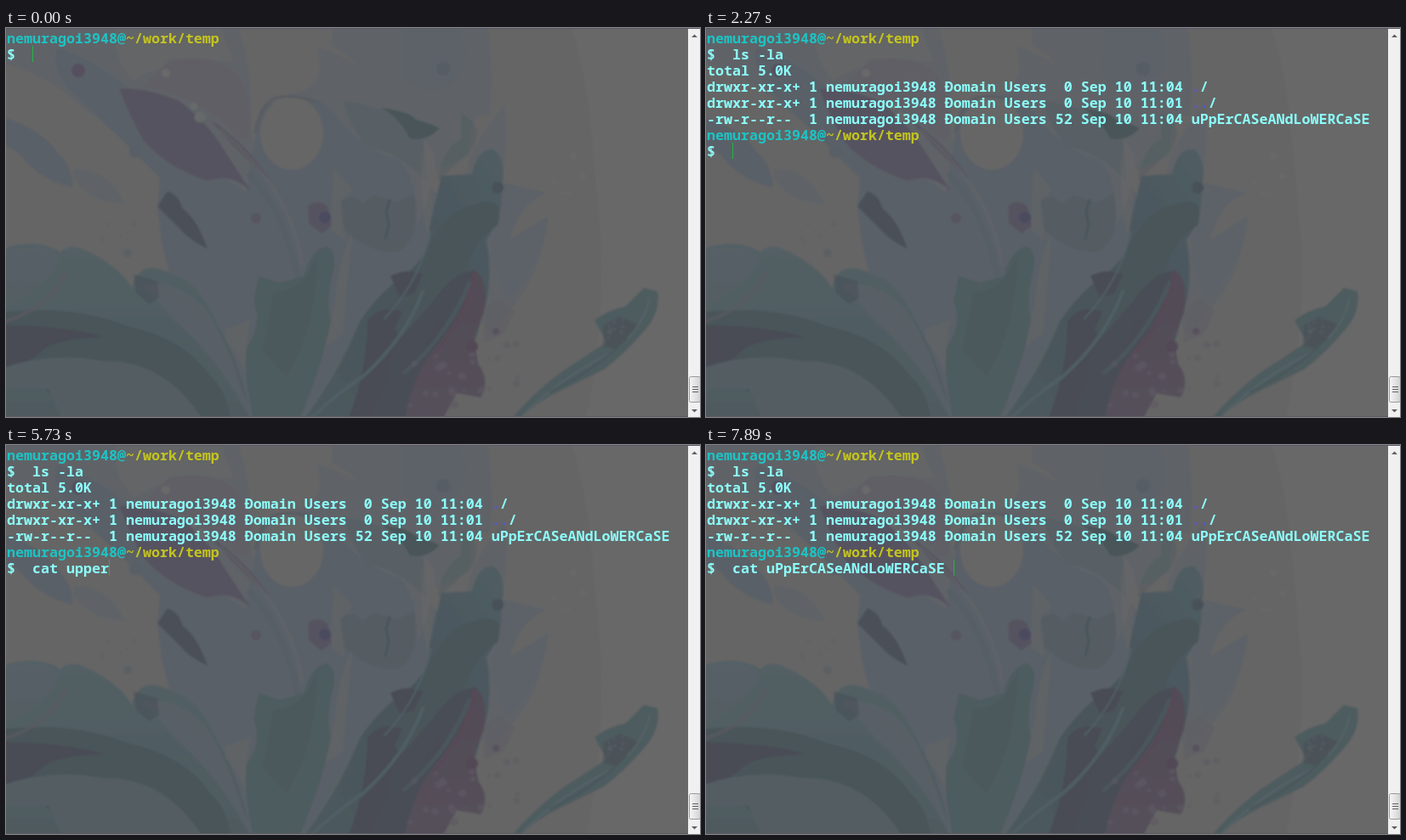
Write an HTML page that moves like this. It is 816x458 px and loops after 8000 ms.

```html
<!DOCTYPE html>
<html lang="en">
<head>
<meta charset="utf-8">
<title>Terminal session</title>
<style>
  html, body { margin: 0; width: 100%; height: 100%; overflow: hidden; background: #656565; }
  svg { display: block; width: 816px; height: 458px; }
  text { font: 600 16.667px "Noto Sans Mono", "DejaVu Sans Mono", monospace; white-space: pre; fill: #8cfffc; }
  .user { fill: #1ec3c4; }
  .path { fill: #c4c41f; }
  .dir { fill: #5858d8; }
  .slate { fill: #5a6167; }
  .mist { fill: #5f6468; }
  .teal { fill: #4e5b5f; }
  .deep { fill: #495559; }
  .ink { fill: #484c55; }
  .plum { fill: #575260; }
  .haze { fill: #605e66; }
  .pale { fill: #666; }
  .vein { fill: none; stroke-linecap: round; }
</style>
</head>
<body>
<svg viewBox="0 0 816 458">
  <defs>
    <linearGradient id="thumb"><stop stop-color="#f6f6f6"/><stop offset="1" stop-color="#d2d2d4"/></linearGradient>
    <linearGradient id="leaf" x2="0" y2="1"><stop stop-color="#526065"/><stop offset="1" stop-color="#4f5a5f"/></linearGradient>
    <linearGradient id="plume" x1="1" x2="0" y2="1"><stop stop-color="#505d63"/><stop offset=".5" stop-color="#48545a"/><stop offset="1" stop-color="#4d5a5e"/></linearGradient>
    <linearGradient id="bloom" x2="0" y2="1"><stop stop-color="#524b56"/><stop offset="1" stop-color="#55505b"/></linearGradient>
    <filter id="soft" x="0" y="0" width="1" height="1"><feGaussianBlur stdDeviation="1.1"/></filter>
  </defs>

  <rect width="816" height="458" fill="#656565"/>
  <g id="painting" filter="url(#soft)">
    <rect x="-9" y="-9" width="834" height="476" fill="#656565"/>
    <path fill="#686868" d="M618 -9H825V467H680Q712 330 692 170Q685 60 665 0Z"/>

    <!-- upper washes -->
    <path class="mist" d="M-9 -9H270Q292 50 287 110L300 190L185 178Q130 120 88 92Q45 52 -9 40Z"/>
    <path class="slate" d="M60 22Q110 40 145 72L150 112L182 150V178Q120 115 80 78Q50 50 60 22Z"/>
    <path class="pale" opacity=".6" d="M130 -9H250L268 40Q200 32 150 62Q120 30 130 -9Z"/>
    <path class="mist" d="M365 22Q410 35 428 60L442 95Q470 98 496 118L500 185L410 200L372 150Q370 90 330 78Q380 74 365 22Z"/>
    <path class="mist" d="M383 -9H566Q575 60 568 105Q545 92 545 150L500 170Q505 130 470 95L440 93Q428 45 383 20Z"/>
    <path class="slate" opacity=".5" d="M470 -9H525Q560 40 515 73Q470 78 466 45Z"/>
    <path class="slate" d="M0 106Q42 120 60 146Q80 165 78 188Q38 178 18 150L0 138Z"/>
    <path class="mist" d="M80 166Q118 164 140 207Q98 206 80 176Z"/>

    <!-- central wash -->
    <path class="slate" d="M184 140Q235 165 282 192Q292 130 300 95Q360 60 390 106Q425 150 480 160L510 200Q515 255 480 285L440 330L400 400L340 467H280L195 300L183 252L178 212Z"/>
    <path class="mist" d="M390 85Q455 80 500 115L498 150Q505 200 480 235Q490 160 440 142Q410 135 390 85Z"/>
    <path class="teal" opacity=".4" d="M396 85Q455 92 490 130L494 180Q460 145 425 140Q405 120 396 85Z"/>
    <path class="deep" d="M440 94Q475 98 482 108Q498 112 510 118Q495 134 475 130Q460 102 440 94Z"/>
    <ellipse class="pale" cx="336" cy="124" rx="37" ry="43"/>
    <path class="vein" stroke="#595c62" stroke-width="3" d="M293 122Q300 88 318 82Q340 77 365 88"/>
    <path class="pale" opacity=".65" d="M385 165L407 190L392 205L398 250L383 238Z"/>
    <path class="pale" opacity=".55" d="M492 130L504 148L506 172L496 245Q482 190 492 130Z"/>

    <!-- purple petals -->
    <path class="haze" d="M192 38Q250 30 272 55Q293 88 285 130L272 130Q236 82 160 70Z"/>
    <path class="plum" d="M133 72Q160 68 204 86Q238 112 256 143L288 192Q265 170 237 180Q190 165 162 133Q146 105 133 72Z"/>
    <path class="plum" d="M240 108Q280 133 310 178Q275 150 240 108Z"/>
    <path class="vein" stroke="#626468" stroke-width="4" opacity=".6" d="M252 120Q335 190 348 278"/>
    <path class="vein" stroke="#565f65" stroke-width="7" d="M287 173Q335 225 350 330"/>
    <path class="ink" opacity=".8" d="M178 210L190 192Q204 197 207 212Q225 225 237 260Q216 250 206 238Q190 222 178 210Z"/>
    <path class="plum" d="M355 210Q365 200 378 210L383 233L371 242L356 230Z"/>
    <circle cx="375" cy="223" r="7" fill="#4c4b60"/>
    <path class="teal" opacity=".5" d="M394 203L409 198L420 207L432 197L460 205L480 195Q490 245 462 263Q430 268 398 238Z"/>
    <path class="vein" stroke="#4a555b" stroke-width="3" d="M451 203L447 216L450 232L446 248"/>
    <path class="slate" d="M392 262Q430 260 440 268L470 280L460 310L430 320Q392 315 392 262Z"/>

    <!-- lower left leaves -->
    <path fill="url(#leaf)" d="M-9 262Q35 245 64 264Q75 252 94 262Q133 280 148 306Q156 270 196 290Q225 295 250 350Q278 400 290 467H-9Z"/>
    <path class="slate" opacity=".5" d="M0 262Q40 252 62 268Q56 300 0 328Z"/>
    <path class="slate" opacity=".8" d="M160 300Q220 300 246 350Q274 400 286 458Q250 390 200 345Z"/>
    <path class="deep" d="M-9 335Q80 325 140 350Q210 365 240 410Q262 430 265 467H80Q60 420 -9 400Z"/>
    <path class="ink" d="M-9 350Q70 350 115 364Q55 365 40 382Q20 400 -9 402Z"/>
    <path fill="#525d62" d="M-9 402Q50 380 115 392Q190 390 235 467H70L50 425L-9 425Z"/>
    <path class="vein" stroke="#585a61" stroke-width="5" opacity=".8" d="M0 345Q50 330 70 288"/>
    <path class="vein" stroke="#566166" stroke-width="5" d="M162 305Q240 345 288 456"/>
    <path class="ink" opacity=".5" d="M150 290L178 298L180 318L168 325L153 312Z"/>
    <path class="pale" opacity=".6" d="M258 355L288 344Q277 375 293 410L286 420Q276 385 258 368Z"/>

    <!-- middle leaves -->
    <path class="teal" d="M297 292L322 300L350 292Q358 262 376 257Q389 260 385 285Q376 320 382 345Q372 400 342 467H292Q278 405 283 375Q302 350 291 322Z"/>
    <path class="deep" opacity=".45" d="M315 312Q350 310 365 270Q365 350 330 410L302 380Z"/>
    <path class="pale" opacity=".5" d="M407 240Q388 285 388 320L375 375L396 360Q400 310 407 240Z"/>
    <path class="vein" stroke="#586266" stroke-width="5" d="M410 345Q395 395 350 456"/>

    <!-- main plume -->
    <path class="mist" d="M545 155Q560 120 586 90Q592 140 582 182L635 194Q603 206 592 250L637 222Q630 290 595 328L570 360L520 300Z"/>
    <path class="slate" opacity=".7" d="M582 182L635 194Q603 206 592 250L637 222Q630 280 590 320L570 270Z"/>
    <path class="teal" opacity=".45" d="M535 100Q565 115 546 145L508 180Q510 145 535 130Z"/>
    <path fill="url(#plume)" d="M345 467Q390 410 416 345Q440 310 472 288Q500 265 498 235L512 174L548 172Q555 140 574 143Q590 156 582 190Q586 220 565 250Q575 300 558 346Q545 400 500 467Z"/>
    <path class="deep" d="M495 265Q515 215 550 208Q588 195 578 232Q544 255 535 300Q505 340 480 400L440 420Q460 330 495 265Z"/>
    <path class="ink" d="M452 292Q470 282 490 290L480 312L464 318ZM425 345Q440 325 466 334L456 355L466 365Q445 390 450 408L426 467H400Q425 405 425 345Z"/>
    <path class="ink" opacity=".85" d="M430 400Q480 350 505 318Q530 285 550 286Q535 350 502 385L470 467H415Z"/>
    <path fill="url(#bloom)" d="M550 284Q568 295 562 335L550 365L555 395Q570 415 558 435L530 430L510 467H468Q475 410 510 370Q540 335 550 284Z"/>
    <path class="vein" stroke="#4b575c" stroke-width="5" d="M545 300Q518 365 468 406"/>
    <path class="vein" stroke="#584a57" stroke-width="3" d="M550 290Q540 345 502 385"/>
    <path class="vein" stroke="#4f5f63" stroke-width="4" d="M490 310Q470 365 420 410Q390 430 360 458"/>
    <path class="vein" stroke="#516166" stroke-width="2" d="M500 240Q485 300 445 342"/>
    <path class="haze" opacity=".7" d="M562 330L580 318L598 333L585 360L562 370Z"/>

    <!-- right feather -->
    <path class="teal" d="M596 458Q635 414 676 390L706 370L692 344Q710 331 728 328L750 306L766 310Q770 335 750 357Q725 386 703 402L650 428Q625 440 606 458Z"/>
    <path class="ink" opacity=".5" d="M703 350L722 340L744 350L718 378L702 374Z"/>
    <path class="vein" stroke="#566468" stroke-width="2" d="M608 455Q655 410 710 383Q748 358 757 318"/>
    <path class="vein" stroke="#48565a" stroke-width="2" d="M640 428Q690 405 730 366"/>

    <g id="spots"></g>
  </g>

  <g id="scrollbar">
    <rect x="802" width="14" height="458" fill="#f0f0f0"/>
    <path fill="#606060" d="M806 11L809.500 7.500L813 11ZM806 449L809.500 452.500L813 449Z"/>
    <rect x="803.500" y="410.500" width="13" height="30" rx="2" fill="url(#thumb)" stroke="#999"/>
    <path stroke="#606060" d="M807 422.500H814M807 425.500H814M807 428.500H814"/>
  </g>
  <rect width="816" height="1" fill="#5c5768"/>
  <rect y="457" width="802" height="1" fill="#5b5b60"/>

  <g id="screen"></g>
  <rect id="cursor" width="1" height="19" fill="#1fb845"/>
</svg>

<script>
  const LOOP = 8000, COL = 10, ROW = 19;
  const ENTER = 2150, LISTED = 2270;
  const USER = 'nemuragoi3948', FILE = 'uPpErCASeANdLoWERCaSE';
  const $ = id => document.getElementById(id);

  // [time, typed command, cursor hidden]
  const steps = [
    [0, ''], [400, '', true], [960, 'l'], [1210, 'ls'], [1330, 'ls '],
    [1480, 'ls -'], [1600, 'ls -l'], [1720, 'ls -la'],
    [LISTED, ''], [2820, '', true], [3350, ''], [3660, 'ca'], [3910, 'cat'],
    [4190, 'cat '], [4620, 'cat ', true], [5150, 'cat u'], [5300, 'cat up'],
    [5450, 'cat upp'], [5570, 'cat uppe'], [5730, 'cat upper'], [6150, 'cat upperc'],
    [6300, 'cat upperca'], [6420, 'cat uppercas'], [6580, 'cat uppercase'],
    [7160, 'cat uppercase', true], [7620, 'cat uppercase'], [7890, `cat ${FILE} `]
  ];

  const span = (name, text) => `<tspan class="${name}">${text}</tspan>`;
  const prompt = span('user', USER + '@') + span('path', '~/work/temp');
  const entry = (mode, size, time, name) =>
    `${mode} 1 ${USER} Đomain Users ${size} Sep 10 ${time} ${name}`;
  const listing = [
    'total 5.0K',
    entry('drwxr-xr-x+', ' 0', '11:04', span('dir', '.') + '/'),
    entry('drwxr-xr-x+', ' 0', '11:01', span('dir', '..') + '/'),
    entry('-rw-r--r-- ', '52', '11:04', FILE)
  ];

  function drawSpots() {
    const dot = (x, y, r, fill, opacity = 1) =>
      `<circle cx="${x}" cy="${y}" r="${r}" fill="${fill}" opacity="${opacity}"/>`;
    let seed = 7;
    const random = () => (seed = seed * 16807 % 2147483647) / 2147483647;
    const scatter = (count, x, y, w, h, size, fill) => Array.from({ length: count }, () =>
      dot(x + w * random(), y + h * random(), size * (.4 + .6 * random()), fill, .6)).join('');
    $('spots').innerHTML =
      dot(85, 50, 8, '#554f5f') + dot(514, 48, 8, '#575d65') + dot(294, 224, 6, '#575461') +
      dot(152, 146, 7, '#585e66') + dot(143, 265, 5, '#5c6064') +
      dot(188, 53, 5, '#686a6a') + dot(221, 92, 4.5, '#686b6b') + dot(228, 105, 6.5, '#666969') +
      dot(548, 375, 7, '#524857') + dot(578, 188, 7, '#485159') + dot(576, 357, 4, '#58515e') +
      scatter(16, 475, 375, 90, 75, 5, '#5f5863') +
      scatter(10, 702, 342, 25, 25, 2, '#5c696d') +
      scatter(8, 565, 365, 40, 60, 4, '#5f5b64') +
      scatter(7, 645, 150, 45, 50, 5, '#696969') +
      scatter(6, 110, 225, 45, 30, 3, '#5e6468');
  }

  let shown;
  function render(time) {
    const [, typed, hidden] = steps.findLast(step => step[0] <= time);
    const listed = time >= LISTED;
    const entered = time >= ENTER && !listed;
    const lines = listed
      ? [prompt, '$  ls -la', ...listing, prompt, '$  ' + typed]
      : [prompt, '$  ' + typed];
    const markup = lines.map((line, row) => `<text x="1" y="${18 + row * ROW}">${line}</text>`).join('');
    if (markup !== shown) $('screen').innerHTML = shown = markup;

    const row = entered ? 2 : lines.length - 1;
    const col = entered ? 0 : 3 + typed.length;
    $('cursor').setAttribute('x', 1 + col * COL);
    $('cursor').setAttribute('y', 2 + row * ROW);
    $('cursor').setAttribute('visibility', hidden ? 'hidden' : 'visible');
  }

  drawSpots();
  const start = performance.now();
  function tick() {
    render((performance.now() - start) % LOOP);
    requestAnimationFrame(tick);
  }
  tick();
</script>
</body>
</html>
```
